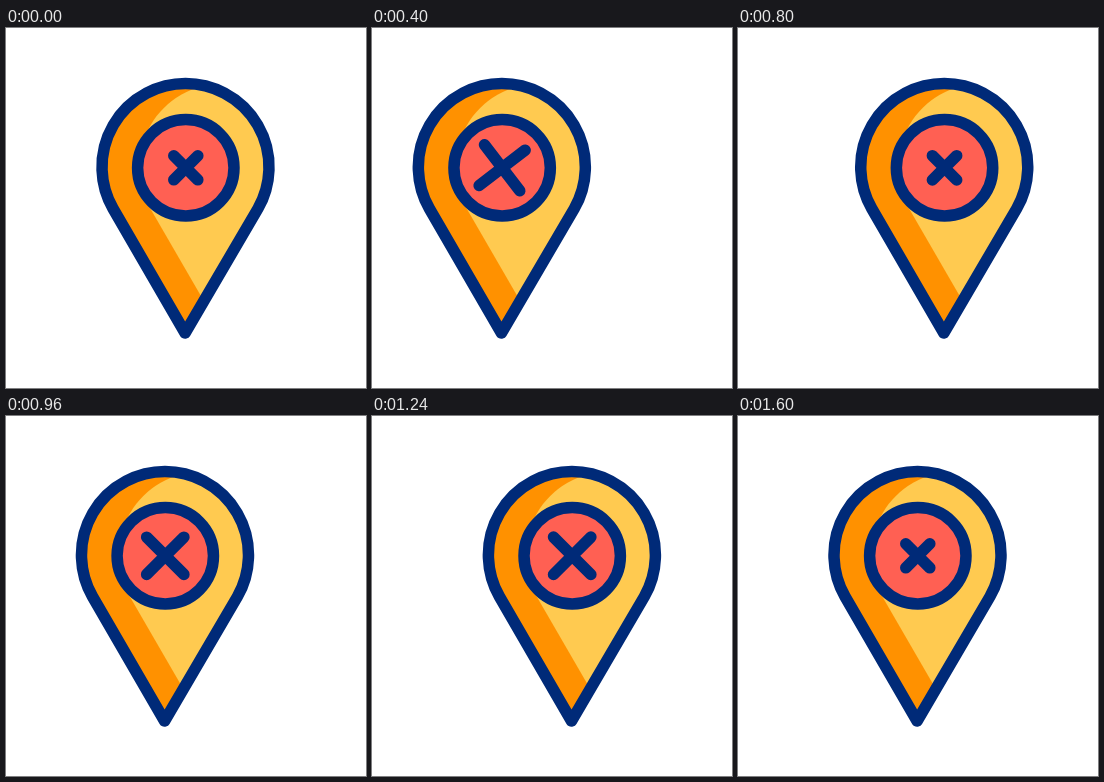
An HTML page for the animation above (2000 ms loop, 360 by 360 pixels).

```html
<!DOCTYPE html>
<html lang="en">
<head>
<meta charset="utf-8">
<title>Map pin</title>
<style>
  html, body { margin: 0; width: 100%; height: 100%; overflow: hidden; background: #fff; }
  svg { display: block; width: 100%; height: 100%; }
  .line { stroke: #002a78; stroke-width: 11.5; stroke-linecap: round; stroke-linejoin: round; }
</style>
</head>
<body>
<svg viewBox="0 0 360 360">
  <defs>
    <path id="shape" d="M-.7 305L-72.8 180.5A83.5 83.5 0 1 1 72.2 180.5Z"/>
    <clipPath id="inside"><use href="#shape"/></clipPath>
  </defs>
  <g id="pin">
    <use href="#shape" fill="#ff9100"/>
    <g clip-path="url(#inside)"><use href="#shape" x="37.3" fill="#ffca50"/></g>
    <use href="#shape" class="line" fill="none"/>
    <circle class="line" cy="139.8" r="48.2" fill="#ff6053"/>
    <path id="cross" class="line"/>
  </g>
</svg>
<script>
  const LOOP = 2000, MOVE_END = 1600, STEP = 40;
  const pin = document.getElementById('pin');
  const cross = document.getElementById('cross');

  // Keys are [time in ms, value]
  const shift = [[0, 0], [390, -50], [684, 48], [1009, -25], [1278, 23], [1525, 0]];
  const turn = [[20, 45], [740, 225]];
  const arm = [[20, 17], [400, 29], [780, 17], [1060, 30.2], [1570, 17]];

  // Eased value between the two neighbouring keys
  function at(keys, t) {
    const next = keys.findIndex(key => key[0] > t);
    if (next === 0) return keys[0][1];
    if (next < 0) return keys[keys.length - 1][1];
    const [t0, v0] = keys[next - 1], [t1, v1] = keys[next];
    const s = (t - t0) / (t1 - t0);
    return v0 + (v1 - v0) * s * s * (3 - 2 * s);
  }

  function draw(now) {
    const t = Math.min(Math.floor(now % LOOP / STEP) * STEP, MOVE_END);
    const length = at(arm, t);
    pin.setAttribute('transform', `translate(${179.8 + at(shift, t)} 0)`);
    cross.setAttribute('d', `M${-length} 0H${length}M0 ${-length}V${length}`);
    cross.setAttribute('transform', `translate(0 139.8) rotate(${at(turn, t)})`);
  }

  const start = performance.now();
  function tick() {
    draw(performance.now() - start);
    requestAnimationFrame(tick);
  }
  tick();
</script>
</body>
</html>
```
